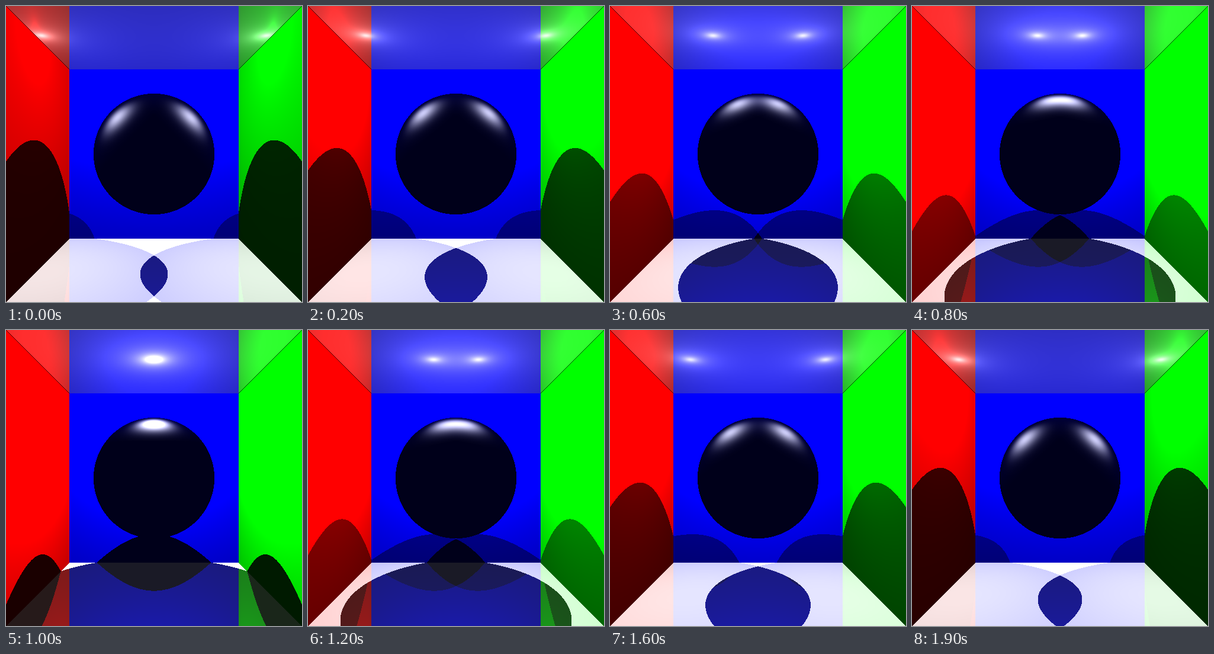
An HTML page with a canvas for the animation above (2 s loop, 500 by 500 pixels).

```html
<!DOCTYPE html>
<html>
<head>
<meta charset="utf-8">
<title>Ray traced box</title>
<style>
  html, body { margin: 0; width: 100%; height: 100%; overflow: hidden; background: #000; }
  canvas { display: block; }
</style>
</head>
<body>
<canvas id="view" width="500" height="500"></canvas>
<script>
// Box spans -1..1 on every axis, sphere sits at the origin, camera looks along +z.
const SIZE = 500, FOCAL = 500, CAMERA_Z = -2.5;
const RADIUS = 0.5, LIGHT_Y = 0.95;
const STEPS = 10, STEP_MS = 100;
const AMBIENT = 0.1, DIFFUSE = 0.8, MIRROR = 0.5;
const SPHERE_DIFFUSE = 0.15, SPECULAR = 0.8, SHININESS = 10;
const RED = [1, 0, 0], GREEN = [0, 1, 0], BLUE = [0, 0, 1], WHITE = [1, 1, 1];

const ctx = document.getElementById('view').getContext('2d');
const rgb = [0, 0, 0];

// Distance to the sphere along a unit ray, or Infinity.
function hitSphere(ox, oy, oz, dx, dy, dz) {
  const b = ox * dx + oy * dy + oz * dz;
  const disc = b * b - (ox * ox + oy * oy + oz * oz - RADIUS * RADIUS);
  if (disc < 0) return Infinity;
  const t = -b - Math.sqrt(disc);
  return t > 1e-6 ? t : Infinity;
}

function addColor(color, amount) {
  for (let i = 0; i < 3; i++) rgb[i] += color[i] * amount;
}

function shadeWall(x, y, z, nx, ny, nz, color, lightX, weight) {
  let light = AMBIENT;
  for (let side = -1; side <= 1; side += 2) {
    let lx = side * lightX - x, ly = LIGHT_Y - y, lz = -z;
    const dist = Math.hypot(lx, ly, lz);
    lx /= dist; ly /= dist; lz /= dist;
    const facing = nx * lx + ny * ly + nz * lz;
    if (facing > 0 && hitSphere(x, y, z, lx, ly, lz) > dist) light += DIFFUSE * facing;
  }
  addColor(color, light * weight);
}

function shadeSphere(x, y, z, dx, dy, dz, lightX, weight) {
  const nx = x / RADIUS, ny = y / RADIUS, nz = z / RADIUS;
  addColor(BLUE, AMBIENT * weight);
  for (let side = -1; side <= 1; side += 2) {
    let lx = side * lightX - x, ly = LIGHT_Y - y, lz = -z;
    const dist = Math.hypot(lx, ly, lz);
    lx /= dist; ly /= dist; lz /= dist;
    const facing = nx * lx + ny * ly + nz * lz;
    if (facing <= 0) continue;
    addColor(BLUE, SPHERE_DIFFUSE * facing * weight);
    const glint = dx * lx + dy * ly + dz * lz - 2 * facing * (nx * dx + ny * dy + nz * dz);
    if (glint > 0) addColor(WHITE, SPECULAR * glint ** SHININESS * weight);
  }
}

function trace(ox, oy, oz, dx, dy, dz, lightX, weight) {
  const sideX = Math.sign(dx), sideY = Math.sign(dy);
  const tx = (sideX - ox) / dx, ty = (sideY - oy) / dy, tz = (1 - oz) / dz;
  const ts = hitSphere(ox, oy, oz, dx, dy, dz);
  const t = Math.min(tx, ty, tz, ts);
  const x = ox + dx * t, y = oy + dy * t, z = oz + dz * t;
  if (t === ts) {
    shadeSphere(x, y, z, dx, dy, dz, lightX, weight);
  } else if (t === tz) {
    shadeWall(x, y, z, 0, 0, -1, BLUE, lightX, weight);
  } else if (t === tx) {
    shadeWall(x, y, z, -sideX, 0, 0, sideX < 0 ? RED : GREEN, lightX, weight);
  } else {
    // Floor and ceiling are half mirrors.
    shadeWall(x, y, z, 0, -sideY, 0, WHITE, lightX, weight);
    if (weight === 1) trace(x, y, z, dx, -dy, dz, lightX, MIRROR);
  }
}

function render(lightX) {
  const image = ctx.createImageData(SIZE, SIZE);
  for (let py = 0, i = 0; py < SIZE; py++) {
    for (let px = 0; px < SIZE; px++, i += 4) {
      const dx = (px + 0.5 - SIZE / 2) / FOCAL, dy = (SIZE / 2 - py - 0.5) / FOCAL;
      const len = Math.hypot(dx, dy, 1);
      rgb.fill(0);
      trace(0, 0, CAMERA_Z, dx / len, dy / len, 1 / len, lightX, 1);
      // Dark seam where the ceiling meets the side walls.
      const seam = py < 107 && (px === py || px === SIZE - 1 - py) ? 0.3 : 1;
      for (let c = 0; c < 3; c++) image.data[i + c] = 255 * Math.min(1, rgb[c]) * seam;
      image.data[i + 3] = 255;
    }
  }
  return image;
}

const poses = [];
let shown = -1;

function draw() {
  const tick = Math.floor(performance.now() / STEP_MS) % (2 * STEPS);
  const pose = STEPS - Math.abs(STEPS - tick);
  if (pose !== shown) {
    poses[pose] ||= render(LIGHT_Y * (1 - pose / STEPS));
    ctx.putImageData(poses[pose], 0, 0);
    shown = pose;
  }
  requestAnimationFrame(draw);
}
draw();
</script>
</body>
</html>
```
